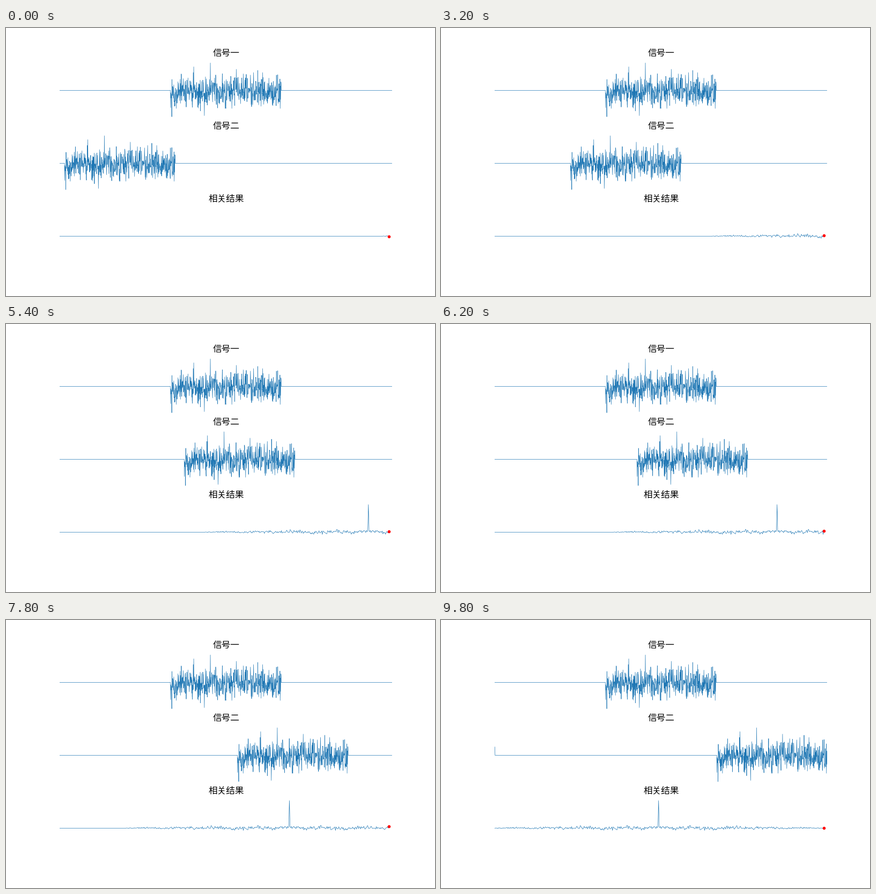
These frames come from a looping animation (800x500 px, 10 s). A matplotlib script:

```python
import numpy as np
import matplotlib.pyplot as plt
from matplotlib.animation import FuncAnimation

plt.rcParams["font.family"] = "Noto Sans CJK JP"

PULSE = 500            # samples in the noise burst
TOTAL = 3 * PULSE      # samples in each signal
LAGS = 501             # points in the result
HOP = 2                # samples between two lags
STEP = 10              # lags per frame
FRAMES = 50
BLUE = "#1f77b4"

# Tallest spikes of the burst: sample index -> height
SPIKES = {1: -0.62, 6: -0.95, 105: 0.86, 135: -0.74, 153: -0.91,
          180: 1.0, 297: 0.77, 394: 0.73, PULSE - 1: 0.29}


def make_burst():
    rng = np.random.default_rng(7)
    burst = np.clip(rng.normal(0, 0.3, PULSE), -0.65, 0.65)
    for i, height in SPIKES.items():
        burst[i] = height
    return burst


burst = make_burst()
fixed = np.pad(burst, PULSE)
moving = np.pad(burst, (0, 2 * PULSE))

corr = np.array([fixed @ np.roll(moving, HOP * k) for k in range(1, LAGS + 1)])
corr /= burst @ burst

fig, axes = plt.subplots(3, 1, figsize=(8, 5), dpi=100)
for ax, title in zip(axes, ("信号一", "信号二", "相关结果")):
    ax.set_title(title, fontsize=12, fontweight="light", x=0.5016)
    ax.set_xlim(0, TOTAL)
    ax.set_ylim(-1.1, 1.1)
    ax.axis("off")
axes[2].set_xlim(0, LAGS + 4)

axes[0].plot(fixed, color=BLUE, lw=0.5)
moving_line, = axes[1].plot(moving, color=BLUE, lw=0.5)
corr_line, = axes[2].plot(np.zeros(LAGS), color=BLUE, lw=0.5)
dot, = axes[2].plot([LAGS - 1], [0], "ro", ms=3)


def update(frame):
    count = STEP * (frame + 1) + 1
    moving_line.set_ydata(np.roll(moving, HOP * count))
    trace = np.zeros(LAGS)
    trace[LAGS - count:] = corr[:count]
    corr_line.set_ydata(trace)
    dot.set_ydata([trace[-1]])
    return moving_line, corr_line, dot


anim = FuncAnimation(fig, update, frames=FRAMES, interval=200,
                     init_func=lambda: update(0), repeat=True, repeat_delay=0)
plt.show()
```
